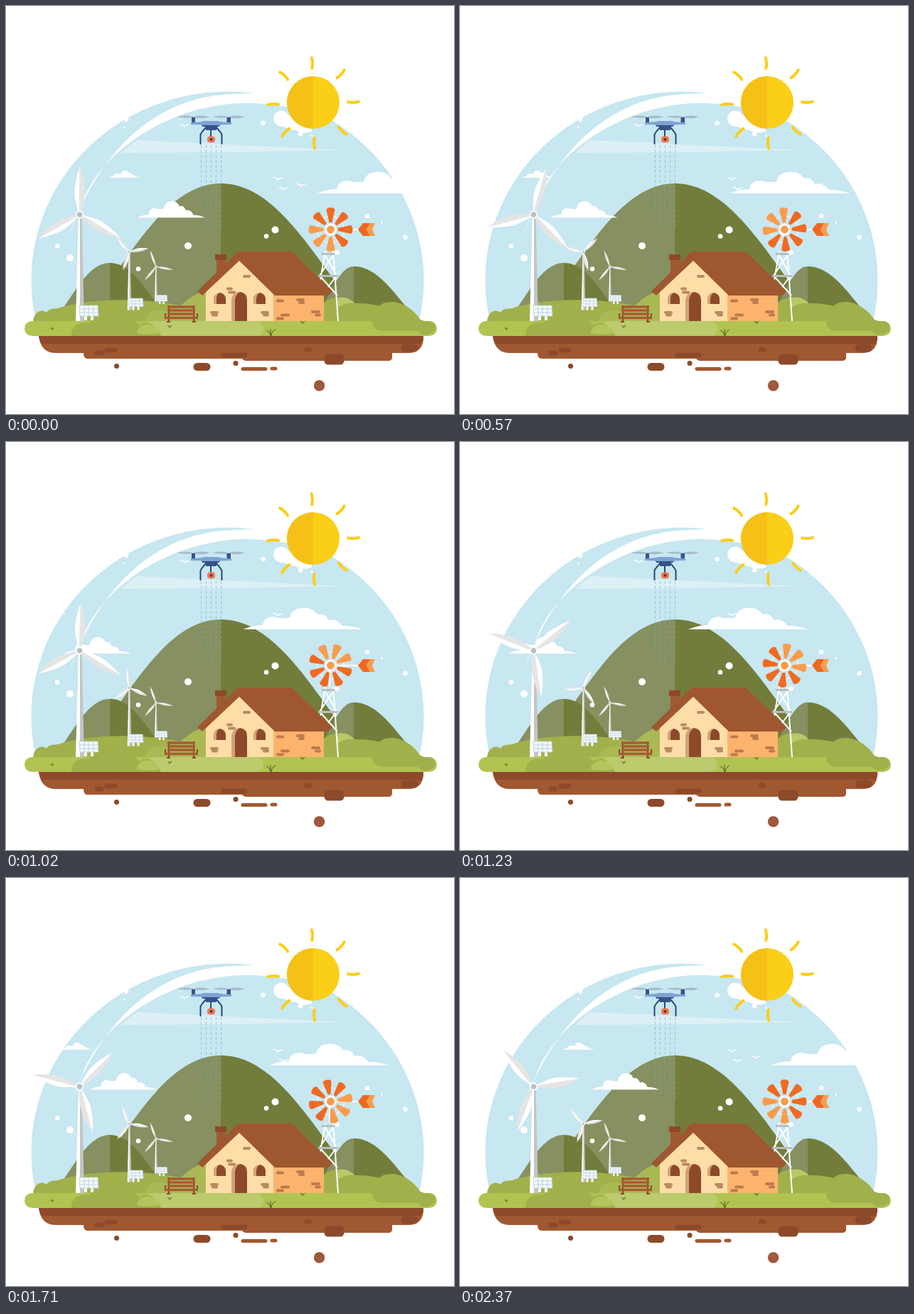
An HTML page that plays this animation: 630x575 px, repeating every 2.4 s.

```html
<!DOCTYPE html>
<html lang="en">
<head>
<meta charset="utf-8">
<style>
html, body { margin: 0; width: 100%; height: 100%; overflow: hidden; background: #fff; }
svg { display: block; width: 630px; height: 575px; }
.round { fill: none; stroke-linecap: round; }
</style>
</head>
<body>
<svg viewBox="0 0 630 575">
  <defs>
    <g id="blade">
      <path fill="#fff" d="M-1 0C-3-12-8-22-7-34C-6-47-3-58 0-67L1 0Z"/>
      <path fill="#e5e5e5" d="M1 0C4-12 7-20 7-34C7-47 4-58 0-67L-1 0Z"/>
    </g>
    <g id="tower">
      <path fill="#fff" d="M-2 0H1V150H-6Z"/><path fill="#c4c4c4" d="M0 0H2.5L6 150H0Z"/>
    </g>
    <g id="panel">
      <path d="M9 14V21M18 14V21" stroke="#fff" stroke-width="4"/>
      <path d="M0 0H26L27 15H1Z" fill="#f4f9fc" stroke="#b5cedb" stroke-width=".8"/>
      <path d="M7 1V15M13 1V15M20 1V15M1 5H26M1 10H27" stroke="#b5cedb" stroke-width=".9"/>
    </g>
    <path id="bird" fill="#fff" d="M-8-1Q-3-4 0 1Q4-3 8 0Q4-1 0 3Q-3-1-8-1"/>
    <path id="cloud" fill="#fff" d="M0 0Q14-6 28-6C28-17 43-20 49-16C58-16 62-15 66-17C68-34 98-34 104-21C113-23 118-18 120-13C131-16 137-8 139-5Q154-5 168 0Z"/>
  </defs>

  <path fill="#c7e7f1" d="M42 444A276 266 0 1 1 581 444Z"/>
  <path fill="#fff" d="M88 325C118 240 185 128 320 124L372 122L400 112V143C370 138 345 136 330 137C215 142 130 215 108 275Z"/>
  <path fill="#dcf0f5" d="M185 189L330 196L476 203L330 206L163 207Q172 196 185 189Z"/>
  <path fill="#fff" d="M376 159a11 11 0 0 1 21-5L430 160V177Q416 181 407 175Q396 174 391 170Q377 170 376 159Z"/>

  <g id="hills"></g>
  <g class="round" stroke="#fff">
    <path stroke-width="10" d="M256 338h.1M378.500 315.500h.1M90 355h.1"/>
    <path stroke-width="6.500" d="M366 324.500h.1M186 370.500h.1M72 338.500h.1M508 296h.1M561.500 326h.1M465.500 347.500h.1M169 160h.1M361.500 165h.1M414 180.500h.1"/>
    <path stroke-width="3" d="M528.500 305h.1M166.500 171h.1M430 183h.1"/>
  </g>
  <use href="#bird" x="382" y="243"/><use href="#bird" x="390" y="257"/>
  <use href="#bird" x="415" y="252"/><use href="#bird" x="251" y="168"/>
  <g id="clouds">
    <use href="#cloud" transform="translate(437.500 264)"/>
    <use href="#cloud" transform="translate(185 298.300)scale(.565 .77)"/>
    <use href="#cloud" transform="translate(144 242)scale(.27 .34)"/>
  </g>

  <circle cx="432" cy="136" r="37" fill="#fbce18"/>
  <path fill="#f5c117" d="M432 99A37 37 0 0 0 432 173Z"/>
  <g id="rays" class="round" stroke="#fbce18" stroke-width="4" transform="translate(432 137)"></g>

  <g id="beams" fill="none" stroke="#5fbcb4" stroke-opacity=".6" stroke-dasharray="4 3"></g>
  <g id="drone">
    <path fill="#a9b9cb" d="M240 156Q252 153 263 156Q276 153 287 156Q276 160 263 157Q252 159 240 156ZM290 156Q302 153 313 156Q326 153 336 156Q326 160 313 157Q302 159 290 156Z"/>
    <path fill="#34558c" d="M261 157H266V166H261ZM310.500 157H316V166H310.500ZM275 167H302L299 170H296V175H281V170H276Z"/>
    <path fill="#7fa2d5" d="M260 164Q273 164 279 162H298Q304 164 317 164V167Q303 167 300 168H277Q273 167 260 167Z"/>
    <path fill="none" stroke="#294873" stroke-width="2" d="M282 170L276 177L273.500 181V195M295 170L301 177L303.500 181V195M288 174V184"/>
    <rect x="283" y="183.500" width="11" height="9" rx="4" fill="#f3774c"/><circle cx="288.500" cy="188" r="2" fill="#453f48"/>
  </g>

  <g fill="#a2b04b">
    <path d="M38 445C39 431 50 426 57 432C61 424 73 428 76 425C125 411 190 412 240 421L276 432V445Z"/>
    <path fill="#abb955" d="M195 445C197 429 217 426 226 430C250 428 254 404 284 403V445Z"/>
    <path d="M446 445V419C454 409 482 407 490 419C520 418 545 427 591 445Z"/>
    <path fill="#b9c967" d="M466 411Q482 408 491 420Q480 416 466 425Z"/>
  </g>

  <rect x="26" y="444" width="580" height="21" rx="10.500" fill="#b1c452"/>
  <rect x="200" y="444" width="162" height="21" rx="9" fill="#bccb6d"/>
  <path fill="#a2b04b" d="M92 465C91 450 105 444 117 447C124 432 153 432 161 444C174 439 185 444 187 450C199 442 209 449 209 456Q216 458 218 465ZM515 446C515 428 527 416 543 417C562 418 577 432 584 444H596Q606 447 603 457C593 467 581 463 580 458H529Q517 458 515 446Z"/>
  <path fill="#b3c55d" d="M184 459Q188 447 202 449Q214 452 216 461Q202 465 184 461Z"/>
  <path fill="none" stroke="#65752f" stroke-width="1.300" d="M366 457Q371 459 372 465M379 456Q373 459 373 465M372 455V465M228 450L230 453L233 450M414 444L417 447L420 444M63 453L65 456L67 453"/>

  <path fill="#a05831" d="M46 465H587V470Q585 489 566 489H543V496Q542 500 538 500H338Q334 500 332 497H114Q109 496 109 489H70Q49 489 46 465Z"/>
  <path fill="#8c4a2a" d="M46 465H587Q587 472 584 476H51Q47 472 46 465Z"/>
  <g class="round" stroke="#8c4a2a">
    <path stroke-width="7" d="M142 485H153M128 489H134M306 492H336M423 484H427M155.500 507.500h.1M323 503.500h.1"/>
    <path stroke-width="11" d="M561 482H574M269 508.500H282M453 496H470M453 500H470"/>
    <path stroke="#a05831" stroke-width="5" d="M333 511.500H365M374 511H379"/>
    <path stroke="#a0583f" stroke-width="15.400" d="M440.500 535h.1"/>
  </g>

  <use href="#tower" x="104" y="294"/>
  <use href="#tower" transform="translate(173.500 346)scale(.46 .55)"/>
  <use href="#tower" transform="translate(211 367)scale(.32 .33)"/>
  <g id="big"></g><g id="mid"></g><g id="far"></g>
  <use href="#panel" x="103" y="422"/>
  <use href="#panel" transform="translate(172 412)scale(.78)"/>
  <use href="#panel" transform="translate(211 407.500)scale(.59)"/>

  <g fill="none" stroke="#fff" stroke-width="2">
    <path d="M449 345L437 415M460 345L467 444M448 350L465 380L446 405M461 350L441 380L466 408M455 315V345M459 315H500"/>
    <path stroke="#bdbdbd" stroke-width="3" d="M444 349.500H462M439 380.500H467"/>
    <circle cx="456.500" cy="315" r="19" stroke-width="1"/>
  </g>
  <path fill="#ef6822" d="M495 315L502 306H512L507 315L512 324H502Z"/>
  <path fill="#fa9c4c" d="M507 315L512 306H519L515 315L519 324H512Z"/>
  <g id="wheel"></g>

  <g id="bench" fill="none" stroke="#a75b34" stroke-width="3.500">
    <path stroke="#8b4728" stroke-width="2" d="M229 422V445M264 422V445M224 433V438M269 433V438M226 445H231M262 445H267"/>
    <path d="M223 439.500H270"/>
  </g>

  <g id="house">
    <path fill="#a05a32" d="M296 356H309V380H296Z"/><path fill="#8d492a" d="M294 350H310V358H294Z"/>
    <path fill="#fcb36e" d="M375 404H447V444H375Z"/>
    <path fill="#fedda7" d="M281 400L328 357L376 402V444H281Z"/>
    <path fill="#9f5730" d="M326 346H402L459 402L453 408H378L328 359L276 408L269 402Z"/>
    <path fill="#d1a377" d="M292 420V413A8 9 0 0 1 308 413V420ZM348 420V413A8 9 0 0 1 364 413V420ZM317 444V415A11 12 0 0 1 339 415V444Z"/>
    <path fill="#8d4a2a" d="M296 420V412Q296 406 301 404Q309 406 309 413V420ZM352 420V412Q353 406 357 404Q365 406 365 413V420ZM322 444V414Q323 406 329 403Q339 404 339 415V444Z"/>
    <g class="round" stroke-width="4">
      <path stroke="#b98a62" d="M335 381H342M312 398.500H317M314 403.500H321M289 432H297M291 435.500H296M360 432H368M363 435.500H368"/>
      <path stroke="#bb7b4c" d="M382 415.500H389M410 414H418M413 418H418M388 435.500H397M382 440.500H389M431 431H440M436 435.500H441"/>
    </g>
  </g>
</svg>
<script>
const $ = id => document.getElementById(id);

function add(id, tag, attrs) {
  const el = document.createElementNS('http://www.w3.org/2000/svg', tag);
  for (const key in attrs) el.setAttribute(key, attrs[key]);
  $(id).append(el);
}

function repeat(count, make) {
  for (let i = 0; i < count; i++) make(i);
}

// Half of a bell-shaped hill, from its foot to its peak
function slope(foot, peak, top, fill) {
  const base = 444, x = k => foot + (peak - foot) * k;
  const shoulder = base - (base - top) * 0.3;
  add('hills', 'path', {fill, d: `M${foot} ${base}C${x(0.3)} ${shoulder} ${x(0.57)} ${top} ${peak} ${top}V${base}Z`});
}

function hill(left, peak, right, top) {
  slope(left, peak, top, '#869060');
  slope(right, peak, top, '#737d3b');
}

function rotor(id, width, length, hub) {
  repeat(3, i => add(id, 'use', {href: '#blade', transform: `rotate(${i * 120}) scale(${width} ${length})`}));
  add(id, 'circle', {r: hub * 1.5, fill: '#fff'});
  add(id, 'circle', {r: hub, fill: '#bfbfbf'});
}

hill(100, 302, 510, 250);
hill(66, 146, 232, 362);
hill(435, 489, 582, 367);

rotor('big', 1, 1, 3.8);
rotor('mid', 0.36, 0.41, 1.7);
rotor('far', 0.22, 0.37, 1.3);

repeat(8, i => add('rays', 'path', {d: 'M0-49Q2-56 0-64', transform: `rotate(${i * 45 - 2})`}));
repeat(5, i => add('beams', 'path', {d: `M${274.5 + i * 7} 196V${i % 3 ? 312 : 290}`}));
repeat(3, i => add('bench', 'path', {d: `M227 ${424 + i * 5}H266`}));

// Five dark vanes followed by three light ones
repeat(8, i => add('wheel', 'path', {
  d: 'M-2-10L-6-28Q-5-31 0-31Q5-31 6-28L2-10Z',
  transform: `rotate(${i * 45 - 45})`,
  fill: i < 5 ? '#f06a22' : '#fa9c4c'
}));
add('wheel', 'circle', {r: 8, fill: '#fff'});
add('wheel', 'circle', {r: 5.5, fill: '#fa9c4c'});

const LOOP = 2400, STEP = 30, CYCLE = LOOP - STEP;

function place(id, x, y, angle) {
  $(id).setAttribute('transform', `translate(${x} ${y}) rotate(${angle})`);
}

function draw(now) {
  const t = Math.floor(now % LOOP / STEP) * STEP;
  const turn = t / CYCLE * 360;
  const drift = 0.102 * Math.min(t, CYCLE - t);
  $('clouds').setAttribute('transform', `translate(${-drift} 0)`);
  place('big', 103.5, 294, t / CYCLE * 560);
  place('mid', 173.5, 346.5, turn - 41);
  place('far', 211, 367.5, -20);
  place('wheel', 456.5, 315, turn);
}

const start = performance.now();
function tick() {
  draw(performance.now() - start);
  requestAnimationFrame(tick);
}
tick();
</script>
</body>
</html>
```
